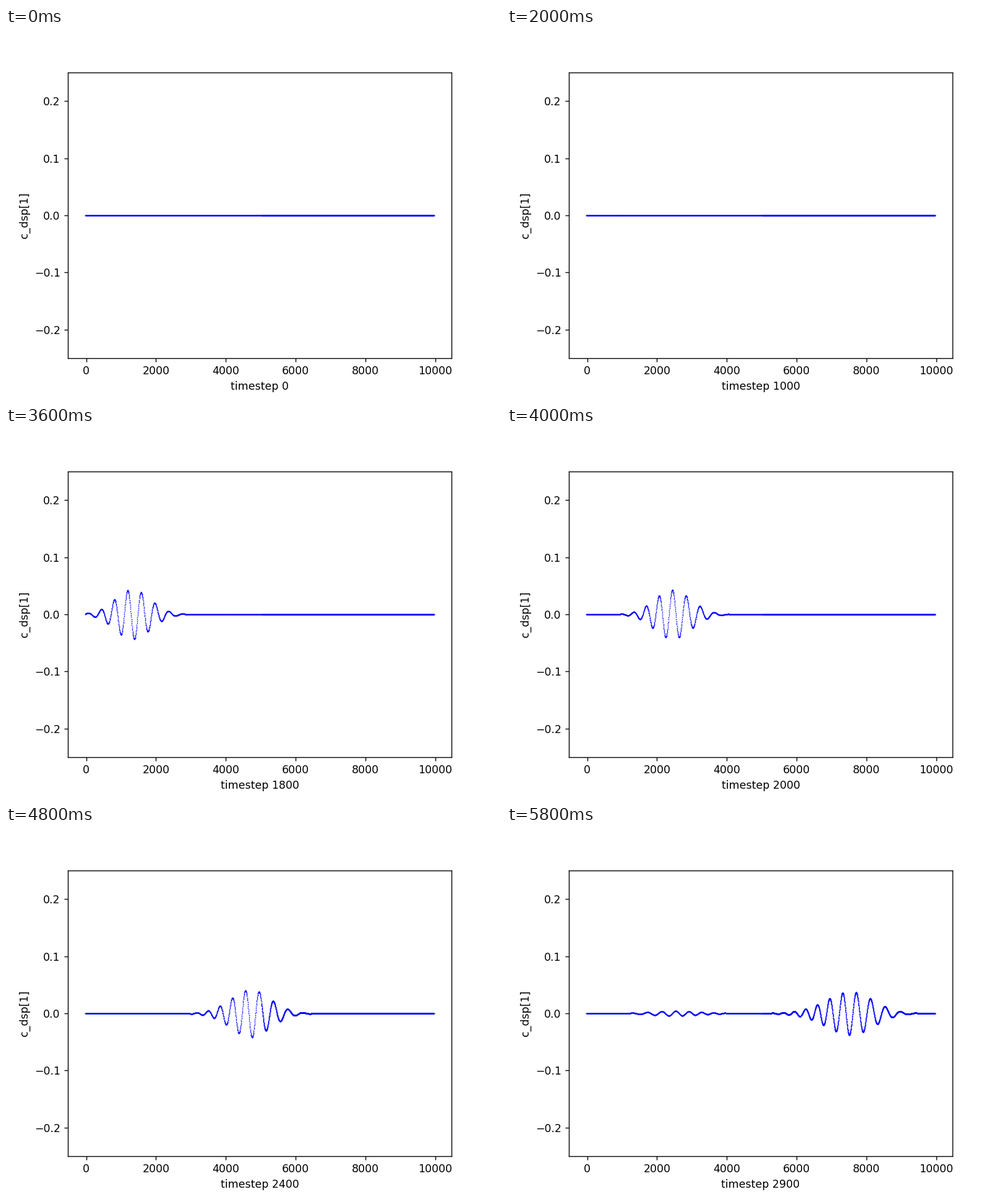
A matplotlib script for the animation above (6000 ms loop, 800 by 600 pixels).

```python
import numpy as np
import matplotlib.pyplot as plt
from matplotlib.animation import FuncAnimation

FRAMES, INTERVAL, STEP = 30, 200, 100

# Dispersive wave packet: carrier, frequency expansion in wavenumber, launch
K0, W0 = 0.0162, 0.1019
VG, D, E = 5.65, -175.0, -30000.0
T0, PHASE = 1563.7, 4.78
AMP, SIGMA = 0.0438, 505.0
# Weak echo from the change of grid density
WALL, ECHO = 5020.0, 0.11

x = np.concatenate([np.arange(-25, WALL, 5), np.arange(WALL, 9963, 2.5)])
kappa = np.linspace(-0.008, 0.008, 161)
weight = np.exp(-(SIGMA * kappa) ** 2 / 2)
weight *= AMP / weight.sum()
omega = W0 + VG * kappa + D * kappa**2 / 2 + E * kappa**3 / 6


def basis(pos):
    return np.exp(1j * np.outer(pos, K0 + kappa))


forward, mirrored = basis(x), basis(2 * WALL - x)
drive = 1 + 1.8 * np.exp(-(x + 25) / 45)
echo = ECHO * np.clip((WALL - x) / 200, 0, 1)


def displacement(t):
    if t <= 1200:  # still at rest
        return np.zeros_like(x)
    spec = weight * np.exp(1j * (PHASE - omega * (t - T0)))
    u = drive * (forward @ spec).real - echo * (mirrored @ spec).real
    u[0] = 0
    return u


fig, ax = plt.subplots(figsize=(6.4, 4.8), dpi=125)
dots, = ax.plot(x, np.zeros_like(x), "b.", markersize=2, markeredgewidth=0)
ax.set_xlim(-523, 10463)
ax.set_ylim(-0.25, 0.25)
ax.set_ylabel("c_dsp[1]")
label = ax.set_xlabel("timestep 0")


def update(i):
    t = i * STEP
    dots.set_ydata(displacement(t))
    label.set_text(f"timestep {t}")
    return dots, label


anim = FuncAnimation(fig, update, frames=FRAMES, interval=INTERVAL,
                     repeat=True, repeat_delay=0, blit=False)
plt.show()
```
